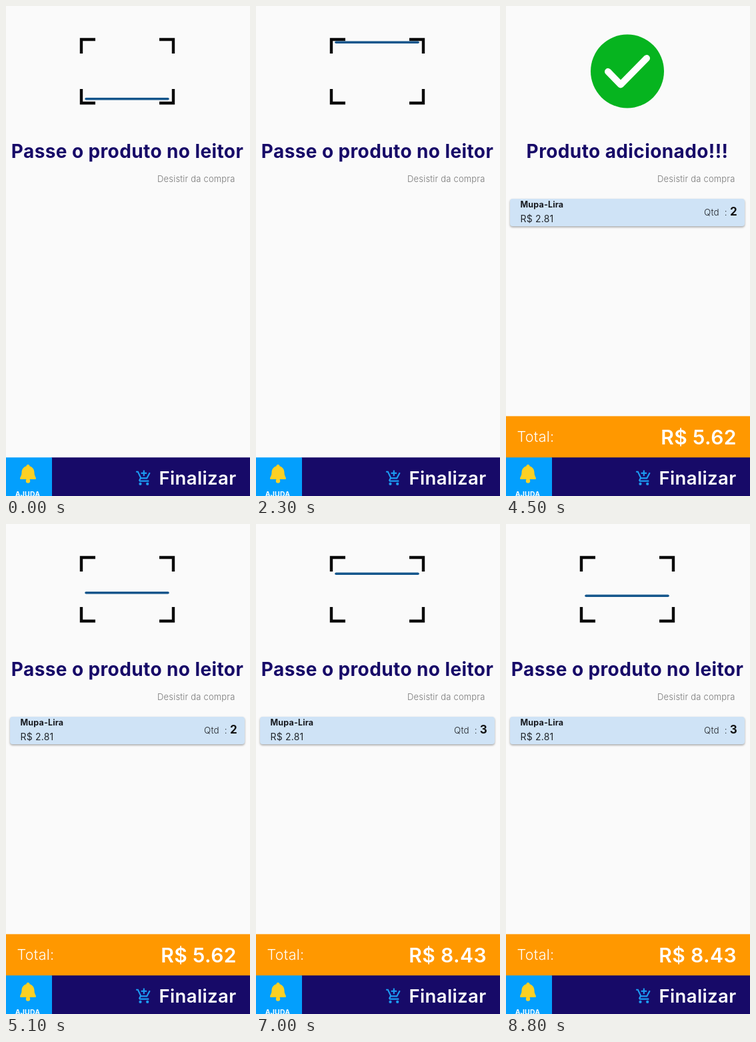
These frames come from a looping animation (366x732 px, 8900 ms). An HTML page with a canvas:

```html
<!DOCTYPE html>
<html lang="pt-BR">
<head>
<meta charset="utf-8">
<title>Leitor</title>
<style>
  html, body { margin: 0; width: 100%; height: 100%; overflow: hidden; background: #fafafa; }
  canvas, svg { position: absolute; left: 0; top: 0; width: 366px; height: 732px; }
  text { font-family: Inter, "Open Sans", sans-serif; white-space: pre; letter-spacing: .014em; }
  .end { text-anchor: end; }
  .mid { text-anchor: middle; }
  .bold { font-weight: 700; }
  .semi { font-weight: 600; }
  .light { font-weight: 300; }
  .white { fill: #fff; }
</style>
</head>
<body>
<canvas id="stage" width="366" height="732"></canvas>
<svg viewBox="0 0 366 732">
  <text id="title" class="mid bold" x="182" y="226.5" font-size="28" fill="#170a68"></text>
  <text class="end light" x="343.5" y="263" font-size="13" fill="#777">Desistir da compra</text>
  <g id="cart">
    <text class="bold" x="21.5" y="301" font-size="12.5" fill="#16181d">Mupa-Lira</text>
    <text x="21.5" y="323" font-size="14" fill="#22262c">R$ 2.81</text>
    <text id="label" class="light" y="313" font-size="13.5" fill="#22262c">Qtd  :</text>
    <text id="count" class="end bold" x="347" y="313" font-size="17" fill="#111"></text>
    <text class="light white" x="16.5" y="651" font-size="21.5">Total:</text>
    <text id="total" class="end semi white" x="346" y="654.5" font-size="30"></text>
  </g>
  <text class="mid bold white" x="32.5" y="733" font-size="10.5">AJUDA</text>
  <text class="end semi white" x="345.5" y="714.5" font-size="27.5">Finalizar</text>
</svg>
<script>
const LOOP = 8900, PRICE = 2.81;
const ADDED = [2500, 4500, 5500];
const CHECKS = [[2500, 4800], [5500, 6700]];
const $ = id => document.getElementById(id);
const c = $('stage').getContext('2d');

function rect(color, x, y, w, h) {
  c.fillStyle = color;
  c.fillRect(x, y, w, h);
}

function disc(color, x, y, r) {
  c.fillStyle = color;
  c.beginPath();
  c.arc(x, y, r, 0, Math.PI * 2);
  c.fill();
}

function line(color, width, points, cap = 'round') {
  c.strokeStyle = color;
  c.lineWidth = width;
  c.lineCap = cap;
  c.lineJoin = cap === 'round' ? 'round' : 'miter';
  c.beginPath();
  points.forEach(([x, y]) => c.lineTo(x, y));
  c.stroke();
}

// The beam swings once every four seconds; its phase restarts on the last scan.
function beamY(t) {
  const top = t < 6000 ? 2185 : 7650;
  return 97 - 43.5 * Math.cos((t - top) * Math.PI / 2000);
}

function drawScanner(t) {
  for (const [x, dx] of [[113, 1], [251, -1]])
    for (const [y, dy] of [[50, 1], [145, -1]])
      line('#080808', 4.4, [[x + 21 * dx, y], [x, y], [x, y + 21 * dy]], 'butt');
  const y = beamY(t);
  line('#14568c', 3.5, [[120, y], [243, y]]);
}

function drawCheck() {
  disc('#06b41f', 182, 97.5, 55);
  line('#fff', 10, [[153, 98], [172, 117.5], [211, 78]]);
}

function drawCard() {
  c.save();
  c.shadowColor = 'rgba(0,0,0,.35)';
  c.shadowBlur = 3;
  c.shadowOffsetY = 1.5;
  c.fillStyle = '#cfe3f6';
  c.beginPath();
  c.roundRect(6, 288, 352, 41, 4);
  c.fill();
  c.restore();
}

function drawBell() {
  const gold = '#fdd023';
  disc(gold, 33, 687.5, 2.5);
  disc(gold, 33, 709.5, 3.2);
  c.beginPath();
  c.moveTo(21.5, 707);
  c.bezierCurveTo(20, 704, 23.5, 703, 23.5, 697);
  c.bezierCurveTo(23.5, 684, 42.5, 684, 42.5, 697);
  c.bezierCurveTo(42.5, 703, 46, 704, 44.5, 707);
  c.closePath();
  c.fill();
}

function drawTrolley() {
  const blue = '#1c9cf2';
  const stroke = points => line(blue, 2, points, 'butt');
  c.save();
  c.translate(194, 692.5);
  c.scale(1.07, 1.07);
  stroke([[12, 1], [12, 9]]);
  stroke([[8, 5], [16, 5]]);
  stroke([[1, 3], [3.6, 3], [7.9, 12], [16.2, 12], [20.3, 4.5]]);
  stroke([[7.6, 11.5], [5.8, 15], [6.4, 16], [19, 16]]);
  disc(blue, 7, 20, 2);
  disc(blue, 17, 20, 2);
  c.restore();
}

function render(t) {
  const checked = CHECKS.some(([a, b]) => t >= a && t < b);
  const qty = ADDED.filter(a => t >= a).length;

  rect('#fafafa', 0, 0, 366, 732);
  checked ? drawCheck() : drawScanner(t);
  if (qty) {
    drawCard();
    rect('#ff9800', 0, 612.7, 366, 62.3);
  }
  rect('#170a68', 68.5, 674.4, 297.5, 57.6);
  rect('#039ffd', 0, 674.4, 69, 57.6);
  drawBell();
  drawTrolley();

  $('title').textContent = checked ? 'Produto adicionado!!!' : 'Passe o produto no leitor';
  $('cart').style.display = qty ? '' : 'none';
  $('label').setAttribute('x', qty > 1 ? 297 : 300);
  $('count').textContent = qty;
  $('total').textContent = 'R$ ' + (qty * PRICE).toFixed(2);
}

const start = performance.now();
function tick() {
  render((performance.now() - start) % LOOP);
  requestAnimationFrame(tick);
}
tick();
</script>
</body>
</html>
```
